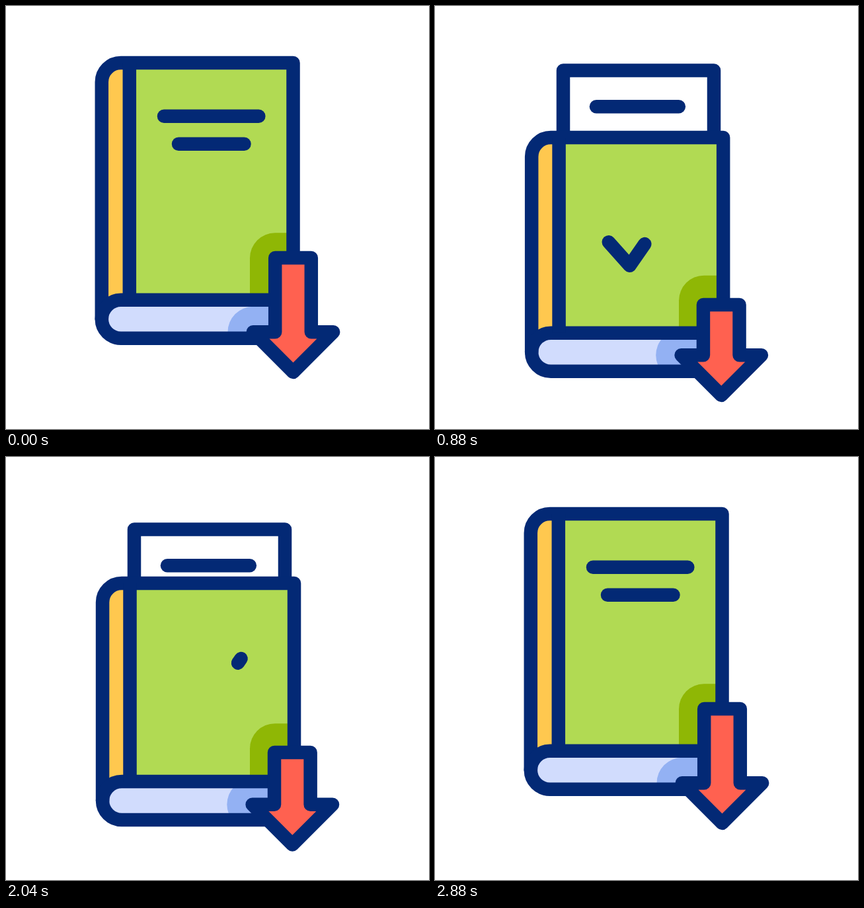
Write an HTML page that moves like this. It is 640x640 px and loops after 3 s.

```html
<!DOCTYPE html>
<html lang="en">
<head>
<meta charset="utf-8">
<title>Book download</title>
<style>
  html, body { margin: 0; width: 100%; height: 100%; overflow: hidden; background: #fff; }
  svg { display: block; width: 100vw; height: 100vh; }
  .line { fill: none; stroke: #032975; stroke-width: 20.5; stroke-linecap: round; stroke-linejoin: round; }
  .butt { stroke-linecap: butt; }
</style>
</head>
<body>
<svg viewBox="0 0 640 640">
  <defs><clipPath id="bandClip"><rect id="bandArea" x="150" width="270" height="58"/></clipPath></defs>
  <g id="page">
    <path class="line" style="fill:#fff" d="M194 215V93H422V215Z"/>
    <path class="line" d="M244 147.7H368.8"/>
  </g>
  <path id="spine" fill="#ffc84f"/>
  <path id="cover" fill="#b1da53"/>
  <path id="coverShade" fill="#8fb705"/>
  <path id="band" fill="#d1dcfd"/>
  <g clip-path="url(#bandClip)"><rect id="bandShade" width="140" height="77" rx="38.5" fill="#93b1f3"/></g>
  <path id="outline" class="line"/>
  <path id="bandLine" class="line butt"/>
  <path id="hinge" class="line butt"/>
  <path id="title" class="line"/>
  <path id="subtitle" class="line"/>
  <path id="check" class="line"/>
  <path id="arrow" class="line" style="fill:#ff6150"/>
</svg>
<script>
const LOOP = 3000;
const el = id => document.getElementById(id);
const setPath = (id, d) => el(id).setAttribute('d', d);
const mix = (a, b, k) => a + (b - a) * k;

// Cubic bezier easing (.685, 0, .2, 1), solved by bisection.
function ease(x) {
  if (x <= 0) return 0;
  if (x >= 1) return 1;
  let lo = 0, hi = 1;
  for (let i = 0; i < 30; i++) {
    const s = (lo + hi) / 2, r = 1 - s;
    if (3 * .685 * s * r * r + 3 * .2 * s * s * r + s ** 3 < x) lo = s; else hi = s;
  }
  return lo * lo * (3 - 2 * lo);
}
const tween = (t, start, duration) => ease((t - start) / duration);

// Shows the part of a polyline between two fractions of its length.
function trim(id, points, from, to) {
  if (to - from < .0005) return setPath(id, '');
  const sizes = points.slice(1).map((p, i) => Math.hypot(p[0] - points[i][0], p[1] - points[i][1]));
  const total = sizes.reduce((a, b) => a + b);
  const at = distance => {
    let i = 0;
    while (i < sizes.length - 1 && distance > sizes[i]) distance -= sizes[i++];
    const k = distance / sizes[i];
    return [mix(points[i][0], points[i + 1][0], k), mix(points[i][1], points[i + 1][1], k)];
  };
  const start = from * total, end = to * total;
  const inner = [];
  let run = 0;
  sizes.slice(0, -1).forEach((size, i) => {
    run += size;
    if (run > start && run < end) inner.push(points[i + 1]);
  });
  setPath(id, 'M' + [at(start), ...inner, at(end)].map(p => p.join(' ')).join('L'));
}

function drawBook(p) {
  const left = mix(144.8, 146.2, p), right = mix(434.5, 436.2, p);
  const hinge = mix(186.8, 187.6, p);
  const top = mix(86, 202.2, p), fold = mix(444.7, 496, p);
  const bend = left + 29, base = fold + 58;

  el('page').setAttribute('transform', `translate(0 ${172 * (1 - p)})`);
  setPath('spine', `M${hinge} ${top}H${bend}a29 29 0 0 0 -29 29V${fold + 29}a29 29 0 0 1 29 -29H${hinge}Z`);
  setPath('cover', `M${hinge} ${top}H${right}V${fold}H${hinge}Z`);
  const shade = mix(343.3, 409.5, p);
  setPath('coverShade', `M369 ${fold}V${shade + 38}a38 38 0 0 1 38 -38H${right}V${fold}Z`);
  const bandShape = `M420 ${fold}H${bend}a29 29 0 0 0 0 58H420`;
  setPath('band', bandShape);
  setPath('bandLine', bandShape);
  el('bandArea').setAttribute('y', fold);
  setPath('outline', `M${right} ${mix(400, 470, p)}V${top}H${bend}a29 29 0 0 0 -29 29V${base - 29}`);
  setPath('hinge', `M${hinge} ${top}V${fold}`);
}

function drawArrow(p) {
  const x = mix(434.5, 433.2, p), top = mix(381, 454, p), wing = mix(493.2, 529.2, p);
  const shade = el('bandShade');
  shade.setAttribute('x', x - 99);
  shade.setAttribute('y', wing - 38.5);
  setPath('arrow', `M${x - 27.3} ${top}h54.6V${wing}h33.4L${x} ${wing + 60.8}L${x - 60.7} ${wing}h33.4Z`);
}

function render(t) {
  const p = tween(t, 112, 961) - tween(t, 1770, 961);
  drawBook(p);
  drawArrow(p);

  const returning = t > 1500;
  const from = returning ? 0 : tween(t, 112, 430);
  const to = returning ? tween(t, 2130, 510) : 1;
  trim('title', [[239, 166.7], [382.3, 166.7]], from, to);
  trim('subtitle', [[261, 208.7], [360.5, 208.7]], from, to);
  trim('check', [[262.8, 357.2], [294.5, 392.8], [355.6, 305]],
    tween(t, 1595, 607), tween(t, 575, 645));
}

const began = performance.now();
function tick() {
  render((performance.now() - began) % LOOP);
  requestAnimationFrame(tick);
}
tick();
</script>
</body>
</html>
```
